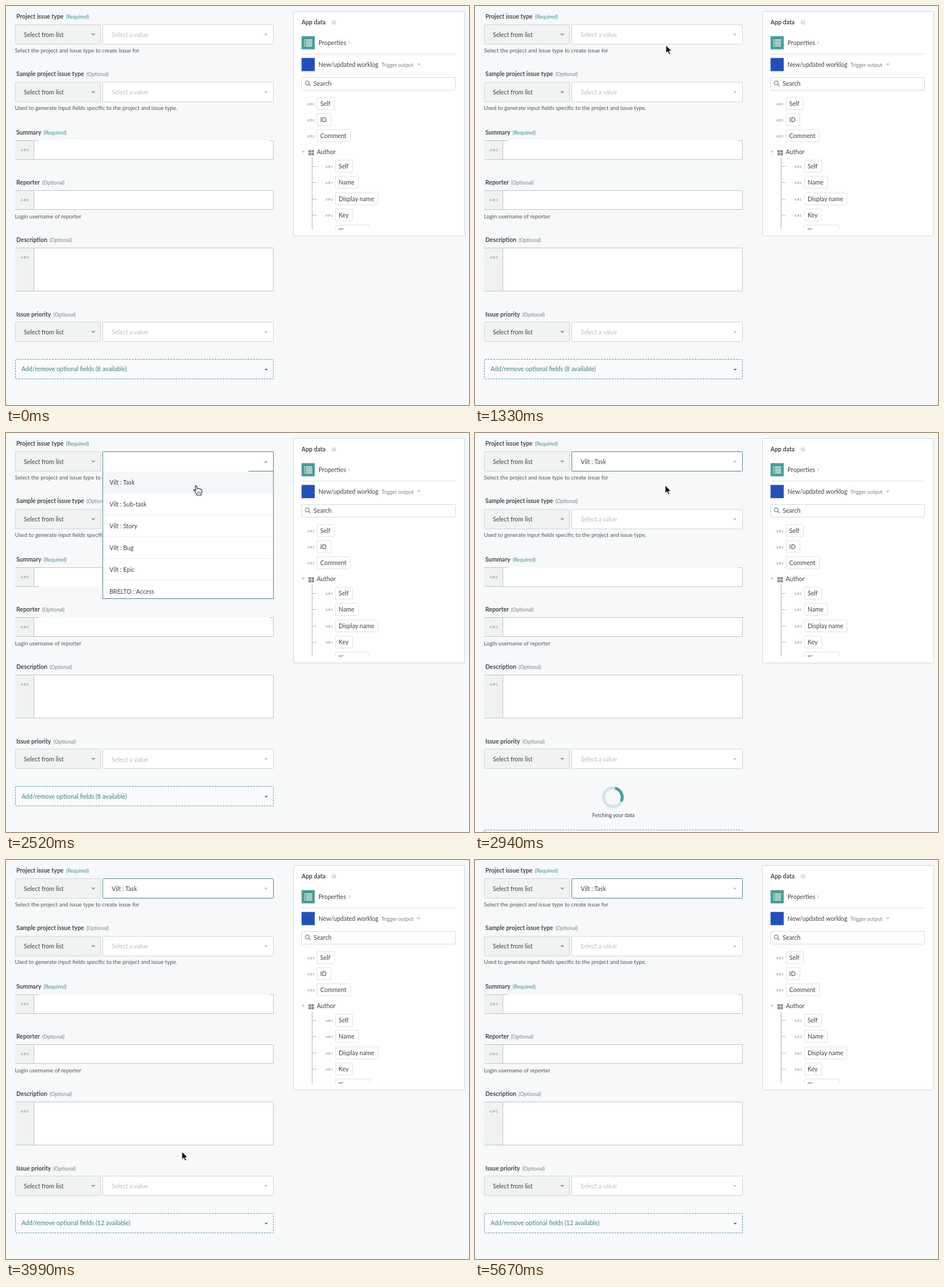
Write an HTML page that moves like this. It is 806x695 px and loops after 5740 ms.

```html
<!DOCTYPE html>
<html lang="en">
<head>
<meta charset="utf-8">
<title>Issue form</title>
<style>
html, body { margin: 0; width: 100%; height: 100%; overflow: hidden; background: #f6f8f9; }
svg { display: block; width: 806px; height: 695px; }
text { font: 10.6px Lato, "Open Sans", sans-serif; fill: #3d4246; white-space: pre; }
.label { font-size: 10.4px; font-weight: 700; fill: #43484c; }
.tag { font-size: 9px; fill: #7b8387; }
.req { fill: #458d8d; }
.help { font-size: 9.7px; fill: #4f5559; }
.hint { fill: #b7bdc0; }
.abc { font-size: 6px; font-weight: 700; letter-spacing: 1.3px; fill: #92999c; }
.mini { font-size: 4.9px; fill: #8b9194; }
.more { fill: #457f7c; }
.small { font-size: 9.1px; }
</style>
</head>
<body>
<svg id="stage" viewBox="0 0 806 695" xmlns="http://www.w3.org/2000/svg"></svg>
<script>
const LOOP = 5740, STEP = 70;
const OPEN = 1680, PICK = 2730, LOAD = 2870, DONE = 3600;
const TEAL = '#4a8788', LINE = '#cfd4d5', EDGE = '#bcc3c4';

const text = (x, mid, str, cls = '', id = '') =>
  `<text x="${x}" y="${mid + 3.8}" class="${cls}"${id && ` id="${id}"`}>${str}</text>`;
const box = (x, y, w, h, fill, stroke = 'none', more = '') =>
  `<rect x="${x}" y="${y}" width="${w}" height="${h}" fill="${fill}" stroke="${stroke}" ${more}/>`;
const path = (d, stroke, more = '') => `<path d="${d}" fill="none" stroke="${stroke}" ${more}/>`;
const shape = (d, fill, more = '') => `<path d="${d}" fill="${fill}" ${more}/>`;
const down = (x, y, r, fill) => shape(`M${x - r} ${y - r / 2}h${2 * r}l${-r} ${r}z`, fill);

function label(y, str, tagX, required) {
  return text(18, y, str, 'label') +
    text(tagX, y, required ? '(Required)' : '(Optional)', required ? 'tag req' : 'tag');
}

function picker(y, id) {
  return box(16.5, y + .5, 148, 34, '#f1f3f3', LINE, 'rx="1"') +
    text(31, y + 18, 'Select from list') + down(152, y + 18, 4, '#9da4a6') +
    box(168.5, y + .5, 297, 34, '#fff', LINE, `rx="1" id="${id}Box"`) +
    text(184, y + 18, 'Select a value', 'hint', id + 'Text') +
    down(452.5, y + 18, 3, '#b4babc');
}

function input(y, h, id) {
  const b = y + h;
  return box(16, y, 32, h, '#f0f2f2') + box(48, y, 418, h, '#fff') +
    path(`M16 ${y + .5}H57M458 ${y + .5}H465.5V${b - .5}M48.5 ${y}V${b}M16 ${b - .5}H57`, EDGE) +
    path(`M57 ${y + .5}H458`, EDGE, `id="${id}Top"`) +
    path(`M57 ${b - .5}H465.5`, EDGE, `id="${id}Bottom"`) +
    text(25.5, y + 15.3, 'ABC', 'abc');
}

function pill(x, mid, w, str) {
  return text(x - 16.5, mid - 1.2, 'ABC', 'abc mini') +
    box(x + .5, mid - 10.5, w, 21, '#fff', '#dfe2e4', 'rx="1"') + text(x + 6, mid, str);
}

function form() {
  return label(18, 'Project issue type', 104.5, true) + picker(32, 'type') +
    text(15.5, 77, 'Select the project and issue type to create issue for', 'help') +
    label(118.5, 'Sample project issue type', 140) + picker(132.5, 'sample') +
    text(15.5, 177.5, 'Used to generate input fields specific to the project and issue type.', 'help') +
    label(220, 'Summary', 65.5, true) + input(234, 34, 'summary') +
    label(307, 'Reporter', 63, false) + input(321, 34, 'reporter') +
    text(15.5, 366, 'Login username of reporter', 'help') +
    label(407.5, 'Description', 76, false) + input(421, 76, 'description') +
    label(537, 'Issue priority', 82.5, false) + picker(550, 'priority') +
    `<g id="more">` +
    box(16.5, 615.5, 449, 34, '#f9fafb', '#5f9794', 'rx="1" stroke-dasharray="3 1.8" id="moreBox"') +
    text(27, 632.5, '', 'more', 'moreText') + down(453, 633.5, 3, '#457f7c') + `</g>` +
    `<g id="loader"><circle cx="240" cy="634.5" r="16.3" fill="none" stroke="#d0e5e6" stroke-width="5"/>` +
    path('M230.6 647.8A16.3 16.3 0 0 1 229.1 622.4', '#4a9c9c', 'stroke-width="5" id="arc"') +
    text(204, 665.5, 'Fetching your data', 'small') + `</g>`;
}

function panel() {
  const list = [0, 1, 2, 3].map(i => {
    const y = 58.5 + i * 3.4;
    return box(519, y, 1.8, 1.6, '#fff') + box(522, y, 11, 1.6, '#fff');
  }).join('');
  const fields = [['Self', 30], ['Name', 40], ['Display name', 74], ['Key', 30], ['Time zone', 60]];
  const tree = fields.map(([name, w], i) => {
    const y = Math.round(278.7 + i * 28.4);
    return path(`M533 ${y + .5}h8`, '#b9bec1') + pill(573, y, w, name);
  }).join('');
  const grid = [0, 1, 2, 3].map(i =>
    box(526.5 + i % 2 * 5.2, 251 + (i >> 1) * 5, 4.5, 4.2, '#8e9497')).join('');
  return box(500.5, 9.5, 298, 391, '#fff', '#d2d6d9', 'rx="1"') +
    text(514.5, 28, 'App data', 'label') +
    `<circle cx="571" cy="28.5" r="4.2" fill="#d9dddf"/>` +
    `<text x="569.4" y="31" style="font-size:7px;fill:#fff;font-weight:700">?</text>` +
    box(514.5, 52.5, 23, 23, '#4a9c97') + list + text(544, 64, 'Properties') +
    path('M596 61.5l2.3 2.3l-2.3 2.3', '#a4abad') + path('M515 83.5H783', '#dfe2e4') +
    box(514.5, 90.5, 23, 23, '#2350b8') + text(544, 102, 'New/updated worklog') +
    text(653.5, 102, 'Trigger output', 'tag') + down(718.5, 102, 3.5, '#c0c5c7') +
    box(514.5, 124.5, 268, 22, '#fff', '#d5d9db', 'rx="1"') +
    `<circle cx="524.5" cy="134" r="3.3" fill="none" stroke="#868d90" stroke-width="1.3"/>` +
    path('M527 136.5l3 3', '#868d90', 'stroke-width="1.6"') +
    text(535.5, 135.5, 'Search') +
    pill(541, 170, 30, 'Self') + pill(541, 198, 24, 'ID') + pill(541, 226, 58, 'Comment') +
    down(517.5, 254, 3, '#b9bfc1') + grid + text(541, 254, 'Author') +
    `<g clip-path="url(#fold)">` + path('M533 264V389', '#a9afb2') + tree + `</g>`;
}

function menu() {
  const kinds = ['Task', 'Sub-task', 'Story', 'Bug', 'Epic'];
  const items = [...kinds.map(k => 'Vilt : ' + k), 'BRELTO : Access'];
  const rows = items.map((item, i) => text(180, Math.round(86 + i * 38), item) +
    (i < 5 ? path(`M169 ${104.5 + i * 38}H465`, '#edf0f1') : '')).join('');
  return `<g id="menu">` + box(168, 32, 298, 257, '#fff') +
    box(169, 67, 296, 37, '#f4f7f9') + rows +
    path('M168.5 67V288.5H465.5V67', TEAL) +
    path('M168.5 67V32.5H465.5V67M422 66.5H465', LINE, 'id="frame"') +
    path('M184.5 44V56', '#333', 'id="caret"') +
    `<g id="tip">${down(0, 0, 3, '#8f9799')}</g></g>`;
}

function pointers() {
  const rim = 'stroke="#fff" stroke-width="1" stroke-linejoin="round"';
  const ink = 'stroke="#222" stroke-width="1.1" stroke-linejoin="round"';
  const beam = 'M-3 -7Q0 -7 0 -5Q0 -7 3 -7M0 -5V5M-3 7Q0 7 0 5Q0 7 3 7M-1.5 1.5H1.5';
  const hand = 'M-1.6 1.2Q-1.6 0 -.2 0Q1 0 1.2 1.2L2 5.6Q2.4 4.6 3.6 4.8Q4.6 4.8 4.9 6' +
    'Q5.6 5 6.7 5.4Q7.6 5.6 7.8 6.8Q9.8 6 10.2 8.2Q10.6 12 8.8 14V16.6H1.2V15' +
    'Q-.8 13 -2 10.6L-4 8.2Q-4.4 6.6 -2.6 6.8L-.4 8.6Z';
  return `<g id="cursor">` +
    `<g id="arrow">${shape('M0 0V14.2L3.3 11.2L5.6 16.4L8 15.4L5.8 10.4H10.2Z', '#111', rim)}</g>` +
    `<g id="beam">${path(beam, '#fff', 'stroke-width="2.6"') + path(beam, '#222', 'stroke-width="1.2"')}</g>` +
    `<g id="hand">${shape(hand, '#fff', ink) +
      path('M2.6 10v4M4.9 10v4M7.2 10v4', '#222', 'stroke-width=".8"')}</g></g>`;
}

const stage = document.getElementById('stage');
stage.innerHTML = `<clipPath id="fold"><rect x="500" y="250" width="298" height="139"/></clipPath>` +
  box(0, 0, 806, 695, '#f6f8f9') + form() + panel() + menu() + pointers();

const el = {};
stage.querySelectorAll('[id]').forEach(n => el[n.id] = n);
const show = (id, on) => el[id].setAttribute('visibility', on ? 'inherit' : 'hidden');
const set = (id, key, value) => el[id].setAttribute(key, value);

// Pointer stops: time, x, y
const route = [
  [420, 830, 480], [730, 320, 75], [1190, 320, 75], [1470, 344.5, 61], [1890, 344.5, 61],
  [2240, 331, 92], [3000, 331, 91], [3640, 331, 91], [4170, 297, 660], [4380, 292, 628.5],
  [4800, 292, 628.5], [5180, 298, 712]
];

function place(t) {
  const i = route.findIndex(p => p[0] > t);
  if (i < 1) return null;
  const [t0, x0, y0] = route[i - 1], [t1, x1, y1] = route[i];
  const p = (t - t0) / (t1 - t0), k = p * p * (3 - 2 * p);
  return [x0 + (x1 - x0) * k, y0 + (y1 - y0) * k];
}

function draw(t) {
  const open = t >= OPEN && t < PICK, picked = t >= PICK;
  const loading = t >= LOAD && t < DONE;
  const at = place(t);

  const flip = Math.min(1, Math.max(0, (t - OPEN) / 140));
  show('menu', open);
  show('caret', open && (t - OPEN) % 1060 < 530);
  set('tip', 'transform', `translate(452.5 50) rotate(${180 * flip})`);
  set('tip', 'opacity', .5 + Math.abs(flip - .5));
  set('frame', 'stroke', flip < 1 ? EDGE : TEAL);
  show('summaryTop', open);
  show('summaryBottom', !open);
  show('reporterTop', !open);

  set('typeBox', 'stroke', picked ? TEAL : LINE);
  el.typeText.textContent = picked ? 'Vilt : Task' : 'Select a value';
  el.typeText.setAttribute('class', picked ? '' : 'hint');

  show('loader', loading);
  set('arc', 'transform', `rotate(${(t - 3500) * .36} 240 634.5)`);
  set('more', 'transform', `translate(0 ${loading ? 76 : 0})`);
  el.moreText.textContent = `Add/remove optional fields (${t >= DONE ? 12 : 8} available)`;
  for (const id of ['moreText', 'priorityText']) set(id, 'transform', `translate(0 ${open ? 1 : 0})`);

  let kind = 'arrow', hover = false;
  if (at) {
    const [x, y] = at;
    hover = t >= DONE && y > 615 && y < 650;
    if (x > 168 && x < 466 && y > 32 && y < 67) kind = 'beam';
    else if (hover || open) kind = 'hand';
    set('cursor', 'transform', `translate(${x} ${y})`);
  }
  set('moreBox', 'stroke', hover ? '#4a9794' : '#5f9794');
  show('cursor', !!at);
  for (const id of ['arrow', 'beam', 'hand']) show(id, id === kind);
}

const start = performance.now();
function tick() {
  const t = (performance.now() - start) % LOOP;
  draw(Math.floor(t / STEP) * STEP);
  requestAnimationFrame(tick);
}
tick();
</script>
</body>
</html>
```
